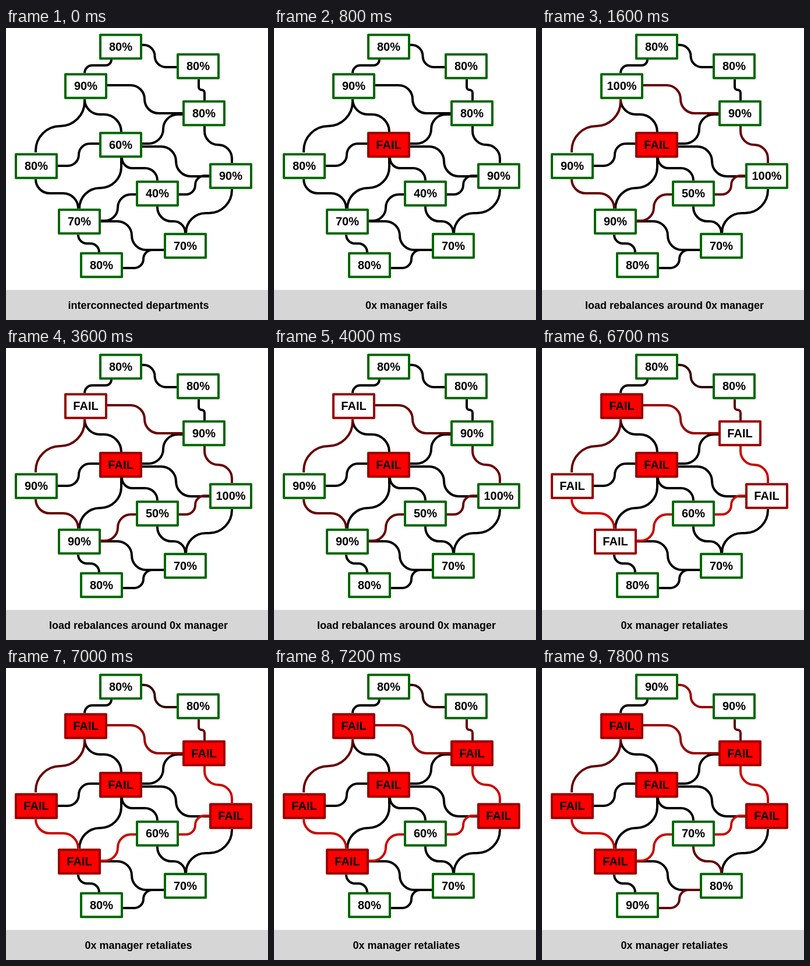
Write an HTML page that moves like this. It is 450 px wide and 500 px high and loops after 8 s.

```html
<!DOCTYPE html>
<html lang="en">
<head>
<meta charset="utf-8">
<title>Load graph</title>
<style>
  html, body { margin: 0; width: 100%; height: 100%; overflow: hidden; background: #fff; }
  svg { display: block; width: 100%; height: 100%; }
  text { font: bold 20px "Liberation Sans", Arial, sans-serif; text-anchor: middle; }
  .caption { font-size: 18px; }
  path { fill: none; stroke-width: 4; }
  rect.node { stroke-width: 4; stroke-linejoin: round; }
</style>
</head>
<body>
<svg viewBox="0 0 450 500"></svg>
<script>
const LOOP = 8000;
const BLINK = 100;
const HEAT = ['#000', '#300', '#600', '#900', '#c00'];

// Box centres
const nodes = {
  A: [197, 32], B: [330, 65.5], C: [137, 99.5], D: [340, 146], E: [197, 200], F: [52, 236.5],
  G: [386, 253.5], H: [260, 283.5], I: [126, 331.5], J: [308, 373], K: [164, 406]
};

// name: [first direction, x1, y1, position of the middle run, x2, y2]
const links = {
  CA: ['v', 135, 77, 64, 181, 54],
  CE: ['v', 135, 122, 148, 198, 178],
  FE: ['h', 89, 236, 125, 160, 198],
  ED: ['h', 234, 198, 270, 303, 148],
  EG: ['h', 234, 203, 292, 349, 254],
  EH: ['v', 199, 222, 240, 260, 261],
  EI: ['v', 198, 222, 274, 126, 309],
  IJ: ['h', 163, 331, 216, 272, 380],
  IK: ['v', 124, 354, 369, 160, 384],
  GJ: ['v', 388, 276, 317, 309, 351],
  HJ: ['v', 260, 305, 331, 308, 351],
  KJ: ['h', 200, 411, 236, 272, 380],
  AB: ['h', 234, 29, 255.5, 293, 67],
  BD: ['v', 331, 88, 106, 341, 124],
  CD: ['h', 174, 98, 238, 303, 146],
  CF: ['v', 135, 122, 168, 51, 213],
  FI: ['v', 51, 259, 283, 124, 309],
  IH: ['h', 163, 330, 192, 224, 285],
  HG: ['h', 297, 285, 325, 349, 253],
  DG: ['v', 341, 168, 200, 388, 231]
};

const failAt = { E: 500, C: 3600, D: 6700, F: 6700, G: 6700, I: 6700 };

const steps = [
  { at: 0, caption: 'interconnected departments',
    load: { A: 80, B: 80, C: 90, D: 80, E: 60, F: 80, G: 90, H: 40, I: 70, J: 70, K: 80 } },
  { at: 500, caption: '0x manager fails' },
  { at: 1300, load: { C: 95, D: 85, F: 85, G: 95, H: 45, I: 80 },
    heat: { CD: 1, CF: 1, FI: 1, IH: 1, HG: 1, DG: 1 } },
  { at: 1600, caption: 'load rebalances around 0x manager',
    load: { C: 100, D: 90, F: 90, G: 100, H: 50, I: 90 },
    heat: { CD: 2, CF: 2, FI: 2, IH: 2, HG: 2, DG: 2 } },
  { at: 4400, load: { D: 95, F: 95, G: 105, H: 55, I: 95 },
    heat: { AB: 1, BD: 1, CD: 3, FI: 3, IH: 3, HG: 3, DG: 3 } },
  { at: 4700, load: { D: 100, F: 100, G: 110, H: 60, I: 100 },
    heat: { BD: 2, FI: 4, IH: 4, HG: 4, DG: 4 } },
  { at: 6700, caption: '0x manager retaliates' },
  { at: 7500, load: { A: 85, B: 85, H: 65, J: 75, K: 85 }, heat: { AB: 2, HJ: 1, KJ: 1 } },
  { at: 7800, load: { A: 90, B: 90, H: 70, J: 80, K: 90 }, heat: { AB: 3, HJ: 2, KJ: 2 } }
];

const svg = document.querySelector('svg');

function add(tag, attrs) {
  const el = document.createElementNS(svg.namespaceURI, tag);
  for (const key in attrs) el.setAttribute(key, attrs[key]);
  return svg.appendChild(el);
}

// Three-part elbow whose corners are as round as the runs allow
function elbow([dir, x1, y1, mid, x2, y2]) {
  const flip = dir === 'v';
  const [a1, b1, a2, b2] = flip ? [y1, x1, y2, x2] : [x1, y1, x2, y2];
  const point = (a, b) => flip ? `${b} ${a}` : `${a} ${b}`;
  const half = Math.abs(b2 - b1) / 2;
  const r1 = Math.min(Math.abs(mid - a1), half);
  const r2 = Math.min(Math.abs(a2 - mid), half);
  const sa = Math.sign(a2 - a1), sb = Math.sign(b2 - b1);
  const sweep = (sa * sb > 0) !== flip ? 1 : 0;
  return `M${point(a1, b1)} L${point(mid - sa * r1, b1)}` +
    `A${r1} ${r1} 0 0 ${sweep} ${point(mid, b1 + sb * r1)}` +
    `L${point(mid, b2 - sb * r2)}` +
    `A${r2} ${r2} 0 0 ${1 - sweep} ${point(mid + sa * r2, b2)} L${point(a2, b2)}`;
}

const lines = {}, boxes = {}, labels = {};
for (const id in links) lines[id] = add('path', { d: elbow(links[id]) });
for (const id in nodes) {
  const [x, y] = nodes[id];
  boxes[id] = add('rect', { class: 'node', x: x - 35, y: y - 20.25, width: 70, height: 40.5 });
  labels[id] = add('text', { x, y: Math.floor(y) + 7 });
}
add('rect', { y: 448.5, width: 450, height: 51.5, fill: '#d6d6d6' });
const caption = add('text', { class: 'caption', x: 227.5, y: 481 });

function stateAt(t) {
  const state = { caption: '', load: {}, heat: {} };
  for (const step of steps) {
    if (step.at > t) break;
    state.caption = step.caption || state.caption;
    Object.assign(state.load, step.load);
    Object.assign(state.heat, step.heat);
  }
  return state;
}

function setText(el, text) {
  if (el.textContent !== text) el.textContent = text;
}

function render(t) {
  const state = stateAt(t);
  setText(caption, state.caption);
  for (const id in lines) lines[id].setAttribute('stroke', HEAT[state.heat[id] || 0]);
  for (const id in nodes) {
    const since = t - failAt[id];
    const failed = since >= 0;
    const lit = failed && (since >= 5 * BLINK || Math.floor(since / BLINK) % 2 === 1);
    boxes[id].setAttribute('fill', lit ? '#f00' : '#fff');
    boxes[id].setAttribute('stroke', failed ? '#900' : '#060');
    setText(labels[id], failed ? 'FAIL' : state.load[id] + '%');
  }
}

const start = performance.now();
function tick() {
  render((performance.now() - start) % LOOP);
  requestAnimationFrame(tick);
}
tick();
</script>
</body>
</html>
```
